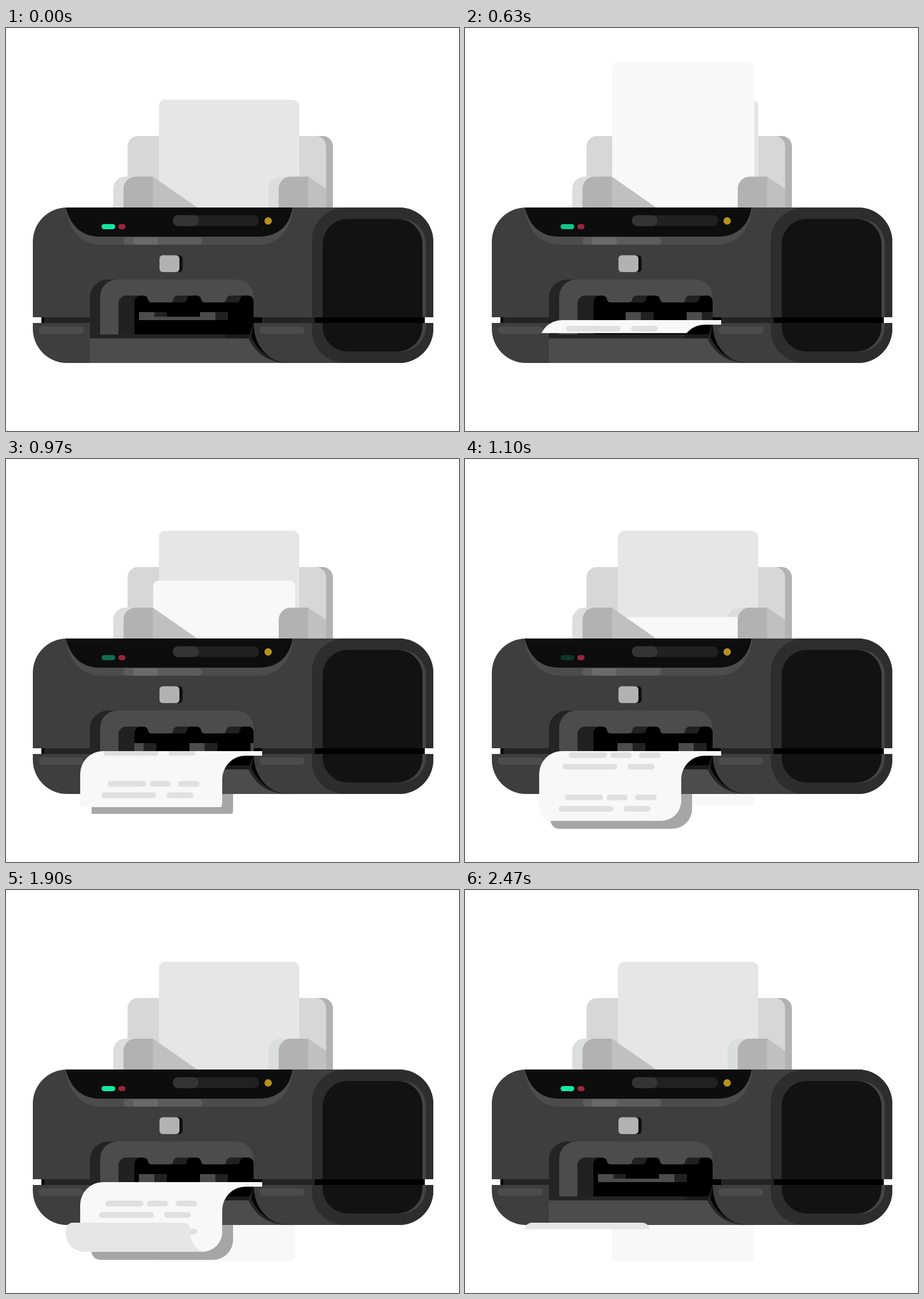
An HTML page that plays this animation: 794x705 px, repeating every 2.5 s.

```html
<!DOCTYPE html>
<html lang="en">
<head>
<meta charset="utf-8">
<title>Printer</title>
<style>
html, body { margin: 0; width: 100%; height: 100%; overflow: hidden; background: #fff; }
svg { display: block; width: 794px; height: 705px; }
</style>
</head>
<body>
<svg viewBox="0 0 794 705">
  <defs>
    <clipPath id="sheetClip"><rect id="sheetWipe" x="100" width="360"/></clipPath>
    <clipPath id="shadowClip"><rect id="shadowWipe" x="140" width="270"/></clipPath>
    <clipPath id="curlClip"><rect id="curlWipe" x="100" y="500" width="290"/></clipPath>
    <clipPath id="curlOutline"><path d="M105 570H323V594C323 618 335 633 352 633H137A32 32 0 0 1 105 601Z"/></clipPath>
    <clipPath id="slotClip"><rect x="225" y="480" width="209" height="31"/></clipPath>
    <path id="page" d="M130 551A40 40 0 0 1 170 511H449V519H420A41 41 0 0 0 379 560V598A35 35 0 0 1 344 633H150A20 20 0 0 1 130 613Z"/>
    <clipPath id="pageClip"><use href="#page"/></clipPath>
    <g id="lines" fill="#e0e0e0">
      <rect y="-5" width="67" height="10" rx="5"/>
      <rect x="73" y="-5" width="37" height="10" rx="5"/>
      <rect x="123" y="-5" width="38" height="10" rx="5"/>
      <rect x="-11" y="15" width="96" height="10" rx="5"/>
      <rect x="103" y="15" width="47" height="10" rx="5"/>
    </g>
    <g id="roller">
      <path fill="#4c4c4c" d="M0 497h27v14H0z"/>
      <path fill="#212121" d="M27 497h22v14H27z"/>
    </g>
  </defs>

  <!-- paper tray -->
  <rect x="230" y="189" width="343" height="150" rx="18" fill="#b2b2b2"/>
  <rect x="213" y="189" width="348" height="150" rx="18" fill="#d7d7d7"/>
  <rect x="268" y="125.500" width="246" height="210" rx="11" fill="#e6e6e6"/>
  <path fill="#dcdddd" d="M188 320V281A21 21 0 0 1 209 260H240V320ZM460 320V281A21 21 0 0 1 481 260H510V320Z"/>
  <rect id="feed" x="258" width="249" height="330" rx="9" fill="#f8f8f8"/>
  <path fill="#b2b2b2" d="M206 320V281A21 21 0 0 1 227 260H258V320ZM478 320V281A21 21 0 0 1 499 260H530V320Z"/>
  <path fill="#c0c0c0" d="M257.500 260L335 314V320H257.500ZM529.500 260L561 281V320H529.500Z"/>

  <g clip-path="url(#shadowClip)">
    <path fill="#a6a6a6" d="M150 560H398V612A35 35 0 0 1 363 647H165A15 15 0 0 1 150 632Z"/>
  </g>

  <!-- body -->
  <rect x="47" y="314" width="702" height="272" rx="60" fill="#3e3e3e"/>
  <path fill="#2d2d2d" d="M594 314H689A60 60 0 0 1 749 374V526A60 60 0 0 1 689 586H594A58 58 0 0 1 536 528V372A58 58 0 0 1 594 314Z"/>
  <rect x="561" y="334" width="175" height="232" rx="44" fill="#444"/>
  <rect x="555" y="334" width="175" height="232" rx="44" fill="#121212"/>
  <path fill="#fff" d="M46 506H62V516H46ZM734 506H750V516H734Z"/>
  <path fill="#242424" d="M67 506H147V516H67ZM449 506H541V516H449Z"/>
  <path d="M62 506H67V516H62ZM434 506H449V516H434ZM541 506H734V516H541Z"/>
  <rect x="57" y="522" width="79" height="13" rx="6.500" fill="#4c4c4c"/>
  <rect x="444" y="522" width="79" height="13" rx="6.500" fill="#4c4c4c"/>

  <!-- control panel -->
  <path fill="#4c4c4c" d="M105 314C108 352 132 379 165 379H443C477 379 501 352 503 314Z"/>
  <path fill="#0d0d0d" d="M105 314C112 345 132 365 165 365H443C477 365 498 345 502 314Z"/>
  <rect x="206" y="366" width="138" height="13" rx="6" fill="#5c5c5c"/>
  <rect x="223" y="366" width="43" height="13" rx="4" fill="#6a6a6a"/>
  <rect x="292.500" y="327.500" width="151" height="19" rx="9" fill="#212121"/>
  <rect x="292.500" y="327.500" width="45" height="19" rx="9" fill="#343434"/>
  <circle cx="459.500" cy="337.500" r="6.500" fill="#b8911e"/>
  <rect id="led" x="167.500" y="343" width="24" height="9" rx="4.500" fill="#12e8a0"/>
  <rect x="197" y="343" width="12.500" height="9" rx="4.500" fill="#98273b"/>
  <rect x="276" y="397.500" width="33.500" height="29.500" rx="6" fill="#0d0d0d"/>
  <rect x="269" y="397.500" width="35" height="29.500" rx="6" fill="#b2b2b2"/>

  <!-- output slot -->
  <path fill="#242424" d="M147 543V472A32 32 0 0 1 179 440H240V536H434V543Z"/>
  <path fill="#4c4c4c" d="M165 536V470A30 30 0 0 1 195 440H404A30 30 0 0 1 434 470V536Z"/>
  <path fill="#212121" d="M197 536V482A14 14 0 0 1 211 468H240V536ZM288 480Q293 479 293 475Q294 468 302 468H330V481H288ZM381 480Q386 479 386 475Q387 468 395 468H423V481H381Z"/>
  <path d="M225 536V480A12 12 0 0 1 237 468H239Q248 468 249 475Q250 480 255 480H311Q316 480 317 475Q318 468 326 468H333Q341 468 342 475Q343 480 348 480H404Q409 480 410 475Q411 468 419 468H424Q434 468 434 480V536Z"/>
  <g clip-path="url(#slotClip)">
    <g id="rollers">
      <use href="#roller" x="-88"/><use href="#roller" x="19"/><use href="#roller" x="126"/>
      <use href="#roller" x="233"/><use href="#roller" x="340"/>
    </g>
    <path id="bar" fill="#4c4c4c" d="M260 505H340V511H260Z"/>
  </g>
  <path fill="#1b1b1b" d="M385 536H428V543H385Z"/>
  <path fill="#4c4c4c" d="M147 543H426C438 569 460 586 497 586H147Z"/>
  <path fill="#242424" d="M425 543L434 516C434 555 455 584 497 586C460 586 438 570 425 543Z"/>
  <path d="M430 540L434 516C434 553 456 580 486 585C460 580 440 563 430 540Z"/>

  <!-- printed page -->
  <g clip-path="url(#sheetClip)">
    <use href="#page" fill="#f8f8f8"/>
    <g clip-path="url(#pageClip)">
      <use id="textA" href="#lines"/>
      <use id="textB" href="#lines"/>
    </g>
  </g>
  <g clip-path="url(#curlClip)">
    <g clip-path="url(#curlOutline)">
      <path id="curl" fill="#e6e6e6" d="M105 594A12 12 0 0 1 117 582H311A12 12 0 0 1 323 594C323 618 335 633 352 633V690H105Z"/>
    </g>
  </g>
</svg>
<script>
const LOOP = 2500;
const $ = id => document.getElementById(id);

// Piecewise linear track: [time, value, time, value, ...]
function track(t, p) {
  if (t <= p[0]) return p[1];
  for (let i = 2; i < p.length; i += 2) {
    if (t <= p[i]) {
      const k = (t - p[i - 2]) / (p[i] - p[i - 2]);
      return p[i - 1] + (p[i + 1] - p[i - 1]) * k;
    }
  }
  return p[p.length - 1];
}

function wipe(id, top, bottom) {
  const r = $(id);
  r.setAttribute('y', top);
  r.setAttribute('height', Math.max(0, bottom - top));
}

const move = (id, x, y) => $(id).setAttribute('transform', `translate(${x} ${y})`);

function draw(t) {
  $('feed').setAttribute('y', track(t, [170, -335, 260, -140, 340, -20, 430, 23, 560, 30, 800, 129, 1100, 276, 1190, 320]));
  $('led').setAttribute('opacity', track(t, [170, 1, 430, .95, 800, .77, 1100, .19, 1150, .1, 1330, 1]));

  const lead = track(t, [540, 505, 670, 546, 800, 577, 1100, 633]);
  const trail = track(t, [1900, 433, 2230, 571, 2370, 633]);
  wipe('sheetWipe', trail, lead);
  wipe('shadowWipe', trail + 14, track(lead, [577, 586, 633, 647]));

  const slide = Math.max(0, t - 1900) * .42;
  move('textA', track(t, [670, 188, 800, 183, 1100, 175, 1330, 174]),
    track(t, [670, 506, 800, 537, 1100, 592, 1330, 597]) + slide);
  move('textB', track(t, [1100, 182, 1330, 174]),
    track(t, [800, 463, 1100, 518, 1330, 548]) + slide);

  move('curl', 0, track(t, [1100, 51, 1330, 0]));
  wipe('curlWipe', 500, track(t, [2370, 633, 2400, 618, 2470, 594, 2500, 582]));

  move('rollers', track(t, [525, 0, 800, 126, 1100, 248, 1330, 321]) % 107, 0);
  $('bar').style.display = lead > 511 && trail < 511 ? 'none' : '';
}

function tick() {
  draw(performance.now() % LOOP);
  requestAnimationFrame(tick);
}
tick();
</script>
</body>
</html>
```
